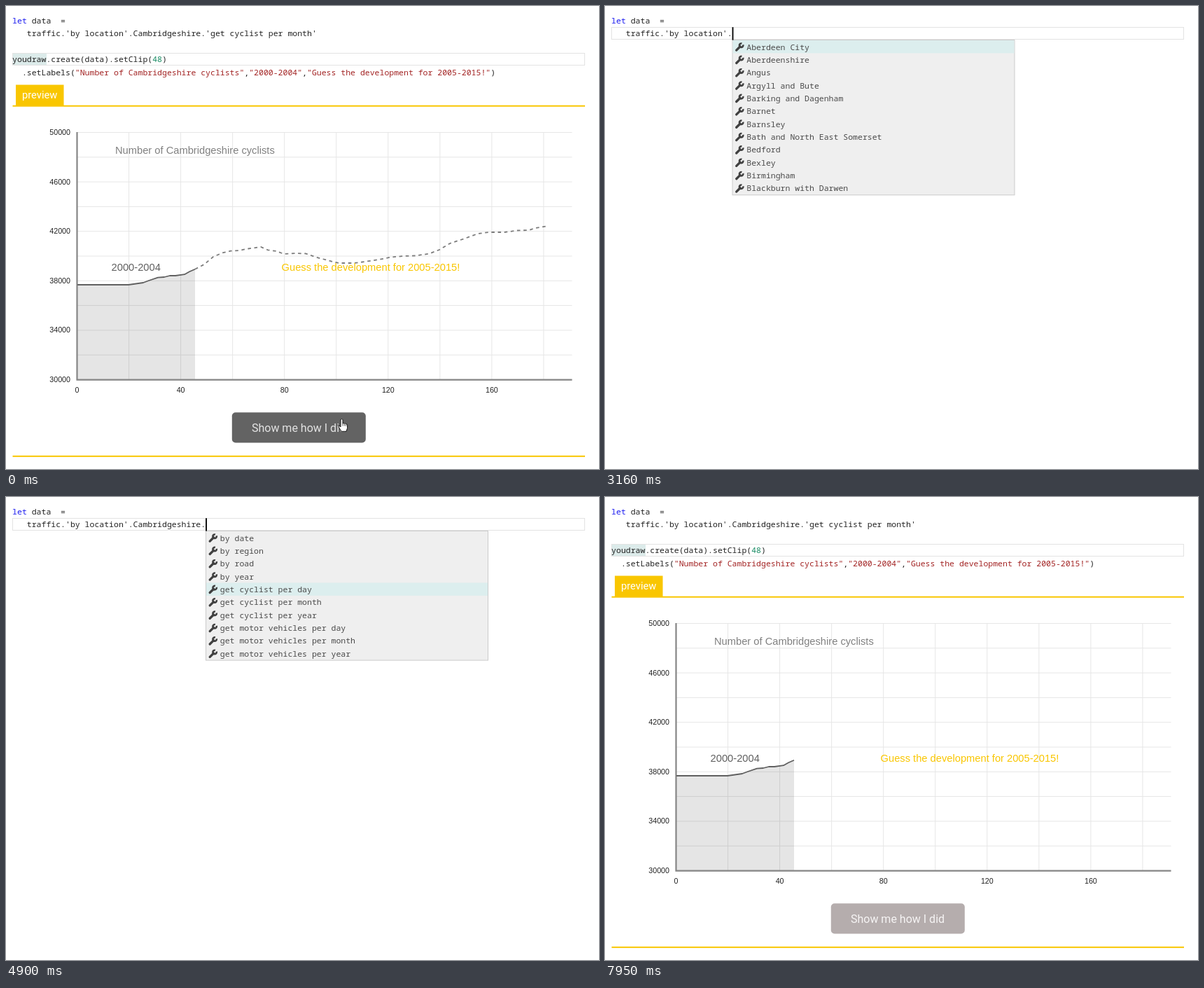
Animation of 847 by 661 pixels, one loop 8 s. Source, as an HTML page:

```html
<!DOCTYPE html>
<html lang="en">
<head>
<meta charset="utf-8">
<title>Code completion and chart preview</title>
<style>
  html, body { margin: 0; width: 100%; height: 100%; overflow: hidden; background: #fff; }
  svg { display: block; width: 847px; height: 661px; }
  text { white-space: pre; }
  .code { font: 11.5px "Noto Sans Mono", "DejaVu Sans Mono", monospace; fill: #222; }
  .item { fill: #4a4a4a; }
  .match { font-weight: 700; fill: #005a9e; }
  .key { fill: #1c1cf0; }
  .str { fill: #a32424; }
  .num { fill: #168a62; }
  .plot { font: 14.7px "Liberation Sans", Arial, sans-serif; }
  .tick { font: 10.7px "Liberation Sans", Arial, sans-serif; fill: #222; }
  .ui { font-family: Roboto, sans-serif; }
</style>
</head>
<body>
<svg id="stage" viewBox="0 0 847 661" xmlns="http://www.w3.org/2000/svg">
  <defs>
    <g id="wrench" fill="none" stroke="#404040">
      <path d="M9.7 1.6A2.7 2.7 0 1 0 11.5 3.4" stroke-width="2.6"/>
      <path d="M7.4 5.8L2 11.1" stroke-width="3.3" stroke-linecap="round"/>
    </g>
  </defs>
  <g id="editor"></g>
  <g id="preview"></g>
  <g id="popup"></g>
  <rect id="caret" width="1.84" height="18.4"/>
</svg>
<script>
const LOOP = 8000, LEFT = 9.1, PITCH = 6.9, LINE = 18.4;
const el = id => document.getElementById(id);
const colX = col => LEFT + col * PITCH;

const text = (x, y, cls, body, attrs = '') =>
  `<text x="${x}" y="${y}" class="${cls}" ${attrs}>${body}</text>`;
const rect = (x, y, w, h, fill, attrs = '') =>
  `<rect x="${x}" y="${y}" width="${w}" height="${h}" fill="${fill}" ${attrs}/>`;
const path = (d, stroke, width, attrs = '') =>
  `<path d="${d}" fill="none" stroke="${stroke}" stroke-width="${width}" ${attrs}/>`;
const span = (cls, body) => `<tspan class="${cls}">${body}</tspan>`;

const HEAD = "   traffic.", PLACE = HEAD + "'by location'", COUNTY = PLACE + '.Cambridgeshire';
const FULL = COUNTY + ".'get cyclist per month'";
const list = names => names.split(',');
const LISTS = {
  dims: list('by date,by location,by region,by road,by year'),
  places: list('Aberdeen City,Aberdeenshire,Angus,Argyll and Bute,Barking and Dagenham,Barnet,Barnsley,' +
    'Bath and North East Somerset,Bedford,Bexley,Birmingham,Blackburn with Darwen'),
  c: list('Caerphilly,Calderdale,Cambridgeshire,Camden,Cardiff,Carmarthenshire,Central Bedfordshire,' +
    'Ceredigion,Cheshire East,Cheshire West,City of London,Clackmannanshire'),
  ca: list('Caerphilly,Calderdale,Cambridgeshire,Camden,Cardiff,Carmarthenshire,Doncaster,Lancashire,' +
    'Newcastle upon Tyne,Redcar and Cleveland'),
  cam: list('Cambridgeshire,Camden'),
  measures: list('by date,by region,by road,by year,get cyclist per day,get cyclist per month,' +
    'get cyclist per year,get motor vehicles per day,get motor vehicles per month,get motor vehicles per year')
};

// Each step lists what changes at that time; the rest carries over.
const on = { caret: true }, off = { caret: false };
const typed = (code, extra) => ({ code, col: code.length, caret: true, ...extra });
const STEPS = [
  [0, { code: FULL, row: 3, col: 0, caret: false, pasted: true, mark: true, chart: true, guess: true, list: '', sel: -1 }],
  [1290, typed(HEAD, { row: 1, pasted: false, mark: false, chart: false, guess: false, list: 'dims', sel: 0 })],
  [1350, { sel: 1 }],
  [1510, off], [1740, on], [2000, off], [2260, on],
  [2420, typed(PLACE, { list: '' })],
  [2680, typed(PLACE + '.')],
  [2780, { list: 'places', sel: -1 }],
  [2940, off], [3000, { sel: 0 }], [3160, on], [3420, off],
  [3460, typed(PLACE + '.c')],
  [3490, { list: 'c', sel: 0 }],
  [3520, typed(PLACE + '.ca')],
  [3540, { list: 'ca', sel: 6 }],
  [3570, typed(PLACE + '.cam')],
  [3600, { list: 'cam', sel: 0 }],
  [3830, typed(COUNTY, { list: '' })],
  [4230, off],
  [4390, typed(COUNTY + '.', { list: 'measures', sel: 0 })],
  [4620, { sel: 1 }], [4680, { sel: 2 }], [4760, { sel: 3 }], [4850, { sel: 4 }], [4930, { sel: 5 }],
  [5090, off], [5320, on], [5580, off], [5810, on], [6070, off],
  [6200, typed(FULL, { list: '' })],
  [6460, off],
  [6560, { row: 2, col: 3, caret: true }],
  [6790, off],
  [6820, { row: 3, caret: true }],
  [6980, { col: 0 }],
  [7080, { row: 4, col: 100, pasted: true }],
  [7180, { chart: true }],
  [7230, { row: 3, col: 0 }],
  [7300, { mark: true }],
  [7460, off], [7720, on], [7950, off]
];

function stateAt(t) {
  const state = {};
  for (const [time, change] of STEPS) if (time <= t) Object.assign(state, change);
  return state;
}

function drawEditor(s) {
  const line = (n, body) => text(LEFT, 25 + n * LINE, 'code', body);
  const top = Math.floor(12 + s.row * LINE) + 0.5;
  let out = s.mark ? rect(9.5, 67.5, 48.5, 17, '#dcebea') : '';
  out += rect(9.5, top, 817, 17, 'none', 'stroke="#e3e3e3"');
  out += line(0, span('key', 'let') + ' data  =') + line(1, s.code);
  if (s.pasted) {
    const labels = ['Number of Cambridgeshire cyclists', '2000-2004', 'Guess the development for 2005-2015!'];
    out += line(3, `youdraw.create(data).setClip(${span('num', 48)})`);
    out += line(4, `  .setLabels(${labels.map(l => span('str', `"${l}"`)).join(',')})`);
  }
  return out;
}

function drawPopup(s) {
  if (!s.list) return '';
  const items = LISTS[s.list], query = s.code.slice(PLACE.length + 1);
  const isFilter = s.list[0] === 'c';
  const left = colX(s.col) + 0.4, row = i => 49 + i * 18.36;
  let out = rect(left, 48.5, 403, items.length * 18.36 + 1, '#efefef', 'stroke="#cbcbcb"');
  if (s.sel >= 0) out += rect(left + 0.5, row(s.sel), 402, 18.4, '#dceeee');
  items.forEach((name, i) => {
    const label = isFilter ? name.replace(RegExp(query, 'i'), m => span('match', m)) : name;
    out += `<use href="#wrench" x="${left + 3.7}" y="${row(i) + 3}"/>`;
    out += text(left + 20.3, row(i) + 13.5, 'code item', label);
  });
  return out;
}

const KNOWN = 'M102 398H152L175 398L196 395L204 392L217 387.6L226 387L234 385L242 385L255 383.2L262 379.3L270 375.8';
const GUESS = 'M270 375.8L283 369L296 358L309 352.5L321 349.7L333 349L346 346.5L364 344L374 348.3L386 350L397 354' +
  'L414 353L428 353.5L441 358L459 363L475 367L497 367L509 365.5L533 362L550 358.5L569 357L585 356.5L605 353.5' +
  'L619 348L634 339L655 332L674 325L690 323L712 323L730 320.5L747 320L756 317L772 314.5';

function drawChart(guess) {
  const yellow = '#f9c600';
  let out = rect(14, 112.5, 68.5, 30, yellow) + text(23, 132, 'ui', 'preview', 'font-size="14.7" fill="#fff"');
  out += rect(9.5, 141.7, 817.5, 2, yellow) + rect(9.5, 641.8, 817.5, 2, yellow);

  let grid = '';
  for (let i = 0; i <= 9; i++) grid += `M${101.5 + i * 74.05} 180.5V534`;
  for (let i = 0; i <= 10; i++) grid += `M101.5 ${180.5 + i * 35.3}H808.5`;
  out += path(grid, '#e6e6e6', 1);
  out += `<path d="${KNOWN}V533.5H102Z" fill="#000" fill-opacity=".1"/>`;
  out += path('M101.5 180V534.5M100.5 533.7H808.5', '#858585', 2.2);
  for (let i = 0; i <= 5; i++) {
    out += text(92, 183.9 + i * 70.6, 'tick', 50000 - i * 4000, 'text-anchor="end"');
    if (i < 5) out += text(101.5 + i * 148.1, 551.5, 'tick', i * 40, 'text-anchor="middle"');
  }
  out += path(KNOWN, '#606060', 1.8, 'stroke-linejoin="round"');
  if (guess) out += path(GUESS, '#7c7c7c', 1.8, 'stroke-dasharray="4.6 4.6"');

  out += text(156, 210.5, 'plot', 'Number of Cambridgeshire cyclists', 'fill="#808080"');
  out += text(150.6, 377.5, 'plot', '2000-2004', 'fill="#606060"');
  out += text(393.6, 377.5, 'plot', 'Guess the development for 2005-2015!', `fill="${yellow}"`);

  out += rect(322.8, 580.3, 191, 43.2, guess ? '#636363' : '#b5adad', 'rx="5"');
  out += text(418, 607.5, 'ui', 'Show me how I did',
    `font-size="16" text-anchor="middle" fill="${guess ? '#e3e3e3' : '#f6f4f4'}"`);
  if (guess) {
    out += '<path d="M478 590.5q1.5-1.8 3 0v5.5q1.3-1 2.4.3q1.4-.7 2.2.5q1.6-.4 2 1.2v4.5l-1.5 4.8h-7' +
      'l-4-6.3q-.8-1.8 1-1.6l1.9 1.6z" fill="#fff" stroke="#111" stroke-width="1" stroke-linejoin="round"/>';
    out += path('M481 596v3.5M483.4 596.6v3M485.6 597.2v2.6', '#111', 0.7);
  }
  return out;
}

let shown = '';
function draw(t) {
  const s = stateAt(t), key = JSON.stringify(s);
  if (key === shown) return;
  shown = key;
  el('editor').innerHTML = drawEditor(s);
  el('preview').innerHTML = s.chart ? drawChart(s.guess) : '';
  el('popup').innerHTML = drawPopup(s);
  const caret = el('caret');
  caret.setAttribute('x', colX(s.col));
  caret.setAttribute('y', 11.8 + s.row * LINE);
  caret.setAttribute('visibility', s.caret ? 'visible' : 'hidden');
}

const start = performance.now();
function tick() {
  draw((performance.now() - start) % LOOP);
  requestAnimationFrame(tick);
}
tick();
</script>
</body>
</html>
```
